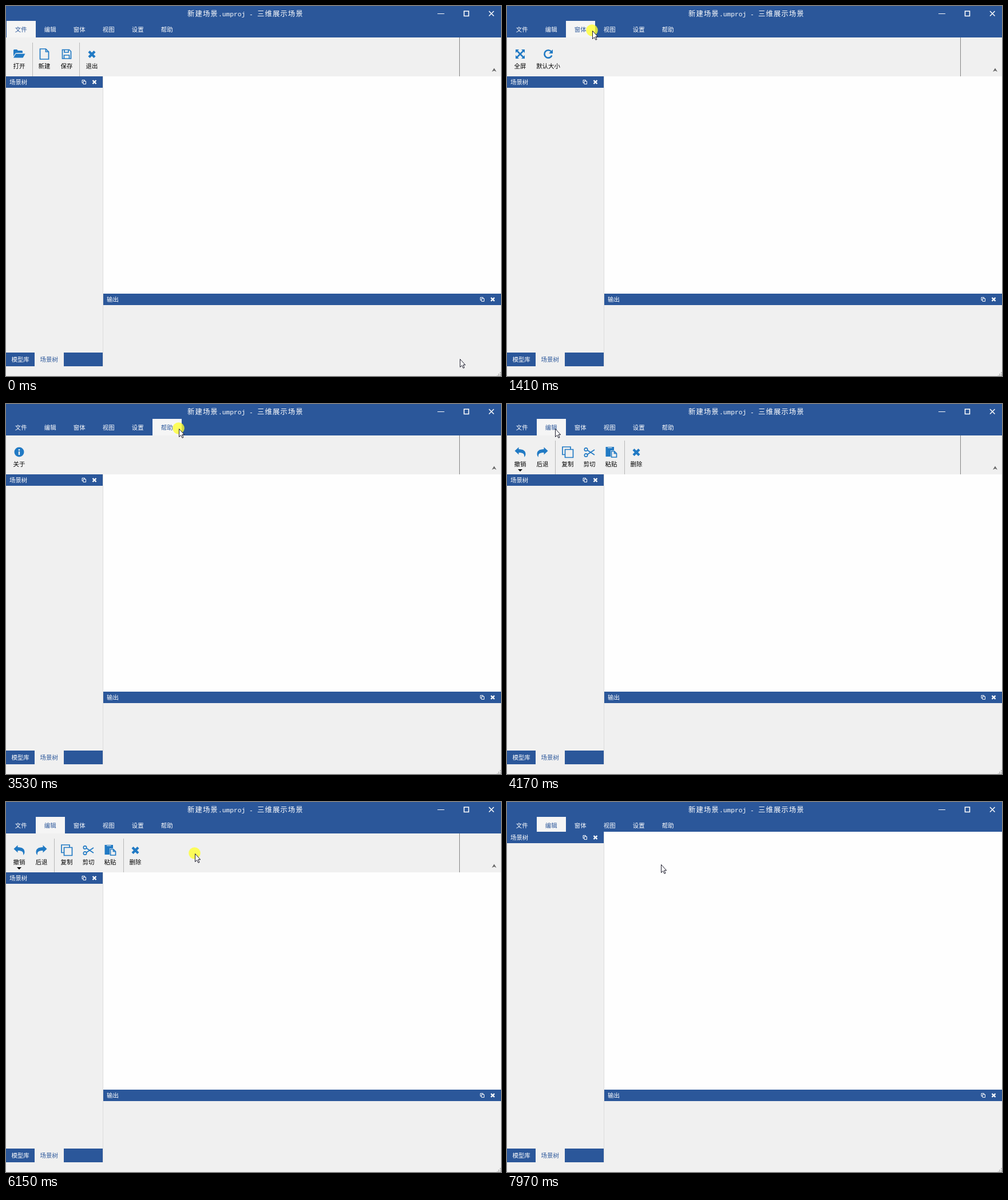
An HTML page for the animation above (8000 ms loop, 865x647 px).

```html
<!DOCTYPE html>
<html lang="zh-CN">
<head>
<meta charset="utf-8">
<style>
html, body { margin: 0; width: 100%; height: 100%; overflow: hidden; background: #f0f0f0; }
svg { display: block; }
text { font: 10.4px "Noto Sans CJK SC", "Noto Sans CJK", sans-serif; }
.title { font-size: 12.4px; letter-spacing: 1.05px; fill: #fff; }
.title .mono { font: 11.25px "Liberation Mono", monospace; letter-spacing: 0; }
.mid { text-anchor: middle; }
.icon { fill: #217ac4; stroke: none; }
.line { fill: none; stroke: #217ac4; stroke-width: 1.7; }
</style>
</head>
<body>
<svg id="stage" width="865" height="647" viewBox="0 0 865 647"></svg>
<script>
const BLUE = '#2b579a', GRAY = '#f0f0f0', LIGHT = '#f5f5f5';
const LOOP = 8000;

const icons = {
  open: '<path class="icon" d="M-10 4V-6.500q0-1.500 1.500-1.500h4.500l2 2h6.500q1.500 0 1.500 1.500V-2H-4.500q-1.500 0-2.300 1zM-10 6.500L-5.800-.5H10.500L6.500 6.500Z"/>',
  file: '<path class="line" d="M-7.500-9H2.500L7.500-4V9H-7.500ZM2.500-9V-4H7.500"/>',
  save: '<path class="line" d="M-7.500-7.500H4.500L7.500-4.500V8H-7.500ZM-4-7.500V-3H3V-7.500M-4.500 8V2H4.500V8"/>',
  cross: '<path class="line" style="stroke-width:4.400" d="M-5-4.500L5 5.500M5-4.500L-5 5.500"/>',
  undo: '<path class="icon" d="M-9.500-2L-2.500-8.500V-5C6-5 9.500-1.500 9.500 3.500C9.500 6 8.500 7.500 7 9C8 3 5 1-2.500 1V4.500Z"/>',
  copy: '<path class="line" d="M-4.500 4.500H-9V-9H5V-5M-4.500-4.500H9.500V9.500H-4.500Z"/>',
  cut: '<path class="line" d="M-4-3.500L9 5M-4 4.500L9-4"/><circle class="line" cx="-6" cy="-4.500" r="2.700"/><circle class="line" cx="-6" cy="5.500" r="2.700"/>',
  paste: '<path class="icon" d="M-9.500-9H5V-3H-1V8H-9.500Z"/><path d="M-6-7.500H1.500" stroke="#f0f0f0"/><path class="line" d="M.5-1.500H5.500L9.500 2.500V9H.5ZM5.500-1.500V2.500H9.500"/>',
  full: '<path class="line" style="stroke-width:2.600" d="M-6-6L6 6M6-6L-6 6"/><path class="icon" d="M-8-8h6l-6 6zM8-8v6l-6-6zM-8 8v-6l6 6zM8 8h-6l6-6z"/>',
  reset: '<path class="line" style="stroke-width:2.700" d="M5.500-4A6.700 6.700 0 1 0 6.300 2.500"/><path class="icon" d="M8-8V-1H1Z"/>',
  info: '<circle class="icon" r="8.500"/><path d="M0-5V-2.500M0-1V5" stroke="#f0f0f0" stroke-width="2.400"/>'
};
icons.redo = `<g transform="scale(-1 1)">${icons.undo}</g>`;

const tabs = [
  { name: '文件', seps: [46, 128], buttons: [['open', 23, '打开'], ['file', 67, '新建'], ['save', 106, '保存'], ['cross', 150, '退出']] },
  { name: '编辑', seps: [84, 205], buttons: [['undo', 23, '撤销'], ['redo', 62, '后退'], ['copy', 106, '复制'], ['cut', 144, '剪切'], ['paste', 182, '粘贴'], ['cross', 226, '删除']] },
  { name: '窗体', seps: [], buttons: [['full', 23, '全屏'], ['reset', 72, '默认大小']] },
  { name: '视图', seps: [], buttons: [] },
  { name: '设置', seps: [], buttons: [] },
  { name: '帮助', seps: [], buttons: [['info', 23, '关于']] }
];

// Runs of screen updates: start time and count, 80 ms apart
const runs = [[0, 1], [70, 7], [700, 1], [860, 4], [1410, 1], [1570, 1], [1730, 7], [2360, 3], [2670, 2],
  [2980, 2], [3210, 2], [3530, 1], [3690, 11], [4570, 8], [5830, 8], [6620, 6], [7180, 11]];
// Pointer keys: time, x, y
const path = [[0, 793, 617], [470, 106, 100], [550, 60, 43], [860, 60, 43], [1100, 149, 43], [1650, 149, 43],
  [1970, 72, 90], [2210, 164, 39], [2590, 164, 39], [2750, 239, 45], [3130, 239, 45], [3290, 302, 43],
  [3610, 302, 43], [3930, 84, 43], [4170, 84, 43], [4490, 80, 80], [5130, 18, 90], [5750, 18, 90],
  [6150, 330, 90], [6310, 452, 133], [6620, 829, 108], [7020, 853, 113], [7180, 853, 113],
  [7420, 761, 168], [7580, 610, 229], [7980, 184, 79]];
const selections = [[0, 0], [700, 1], [1410, 2], [2440, 3], [2980, 4], [3530, 5], [4010, 1]];
const presses = [[700, 860], [1410, 1570], [2440, 2520], [2980, 3060], [3530, 3690], [4010, 4170], [6150, 6230], [7180, 7260]];

const rect = (x, y, w, h, fill, extra = '') => `<rect x="${x}" y="${y}" width="${w}" height="${h}" fill="${fill}" ${extra}/>`;
const label = (x, y, s, fill, extra = '') => `<text x="${x}" y="${y}" fill="${fill}" ${extra}>${s}</text>`;
const vline = (x, y1, y2, color) => `<path d="M${x + .5} ${y1}V${y2}" stroke="${color}"/>`;
const bar = (x, y, w, s) => rect(x, y, w, 20, BLUE) + label(x + 6, y + 14.2, s, '#fff') +
  `<g transform="translate(${x + w} ${y + 10})" fill="none" stroke="#fff">
    <path d="M-34.500 1.500h-1.500v-5h4.500v1.500M-34-1.500h4.500v5h-4.500z"/>
    <path d="M-17.500-3l6 6M-11.500-3l-6 6" stroke-width="2.400"/></g>`;
const halfWidth = s => s.length > 2 ? 25 : 18;

const button = ([icon, x, s]) => `<g class="button">
  ${rect(x - halfWidth(s), 66, 2 * halfWidth(s), 54, '#f8f8f8', 'class="hover"')}
  <g transform="translate(${x} 84)">${icons[icon]}</g>
  ${label(x, 109, s, '#000', 'class="mid"')}
  ${icon === 'undo' ? '<path d="M19 114h8l-4 4z"/>' : ''}</g>`;

const stage = document.getElementById('stage');
stage.innerHTML = rect(0, 0, 865, 647, GRAY) + rect(0, 0, 865, 55, BLUE) +
  `<text class="title" x="317" y="18">新建场景</text>
  <text class="title" x="371" y="17.500"><tspan class="mono" xml:space="preserve">.umproj - </tspan></text>
  <text class="title" x="439" y="18">三维展示场景</text>
  <g fill="none" stroke="#fff"><path d="M754 13.500h12"/><path d="M800.500 9h8v8.500h-8z" stroke-width="1.600"/>
  <path d="M844 9l8.500 8.500M852.500 9l-8.500 8.500" stroke-width="1.500"/></g>` +
  tabs.map((tab, i) => `<g class="tab">${rect(1 + 51 * i, 26, 51, 29, LIGHT)}
    ${label(26.2 + 51 * i, 45, tab.name, '#fff', 'class="mid"')}</g>`).join('') +
  tabs.map(tab => `<g class="ribbon">${tab.seps.map(x => vline(x, 64, 123, '#b8b8b8')).join('')}
    ${tab.buttons.map(button).join('')}</g>`).join('') +
  vline(792, 55, 123, '#848484') +
  `<path d="M849 115l4-6.500 4 6.500-4-2z" fill="#666"/>` +
  `<g id="body">${rect(0, 0, 169, 560, GRAY)}${rect(170, 0, 695, 560, '#fefefe')}${bar(0, 0, 169, '场景树')}</g>` +
  rect(0, 606, 169, 24, BLUE) + rect(50, 606, 51, 24, GRAY) +
  label(25, 622, '模型库', '#fff', 'class="mid"') + label(75.2, 622, '场景树', BLUE, 'class="mid"') +
  rect(0, 630, 865, 17, GRAY) + rect(170, 523, 695, 124, GRAY) + bar(170, 503, 695, '输出') +
  `<path id="divider" stroke="#dcdcdc"/>
  <path d="M863 641h2M860 644h2M863 644h2M858 646.500h1M860 646.500h2M863 646.500h2" stroke="#aaa" stroke-width="1.500"/>` +
  label(4, 643, '', '#000', 'id="tip"') +
  `<g id="pointer"><circle id="press" cx="-.5" cy="-.5" r="10.300" fill="#ffff2e" opacity=".78"/>
  <path d="M.5.5V14.500L3.700 11.500L6 16.300L8 15.400L5.800 10.700H9.700Z" fill="#fff" stroke="#1c1c2c"/></g>`;

const el = id => document.getElementById(id);
const tabNodes = [...stage.querySelectorAll('.tab')];
const ribbonNodes = [...stage.querySelectorAll('.ribbon')];
const show = (node, on) => node.setAttribute('visibility', on ? 'visible' : 'hidden');

function lastUpdate(t) {
  const [start, count] = runs.filter(run => run[0] <= t).pop();
  return start + 80 * Math.min(count - 1, Math.floor((t - start) / 80));
}

function pointerAt(t) {
  const next = path.findIndex(key => key[0] > t);
  if (next < 0) return path[path.length - 1].slice(1);
  const [t0, x0, y0] = path[next - 1], [t1, x1, y1] = path[next];
  const u = (t - t0) / (t1 - t0);
  return [x0 + (x1 - x0) * u, y0 + (y1 - y0) * u];
}

function render(time) {
  const t = lastUpdate(time);
  const [x, y] = pointerAt(t);
  const selected = selections.filter(s => s[0] <= t).pop()[1];
  const visible = t < 6390 || t >= 6620;
  const top = 123 - 71 * Math.min(1, Math.max(0, (t - 7140) / 430));

  tabNodes.forEach((node, i) => {
    const hovered = y >= 26 && y < 55 && x >= 1 + 51 * i && x < 52 + 51 * i;
    const [box, text] = node.children;
    box.setAttribute('fill', i === selected ? LIGHT : hovered ? '#3e6db5' : BLUE);
    text.setAttribute('fill', i === selected ? BLUE : '#fff');
  });

  let tip = '';
  ribbonNodes.forEach((node, i) => {
    node.style.display = i === selected ? '' : 'none';
    if (i !== selected) return;
    node.querySelectorAll('.hover').forEach((box, k) => {
      const [, cx, name] = tabs[i].buttons[k];
      const hovered = visible && y >= 66 && y < 120 && Math.abs(x - cx) <= halfWidth(name);
      box.setAttribute('opacity', hovered ? 1 : 0);
      if (hovered) tip = name;
    });
  });
  el('tip').textContent = t < 5830 ? tip : '';

  el('body').setAttribute('transform', `translate(0 ${Math.round(top)})`);
  el('divider').setAttribute('d', `M169.500 ${Math.round(top)}V630`);
  el('pointer').setAttribute('transform', `translate(${Math.round(x)} ${Math.round(y)})`);
  el('pointer').style.display = visible ? '' : 'none';
  show(el('press'), presses.some(([a, b]) => t >= a && t < b));
}

const began = performance.now();
function tick() {
  render((performance.now() - began) % LOOP);
  requestAnimationFrame(tick);
}
tick();
</script>
</body>
</html>
```
